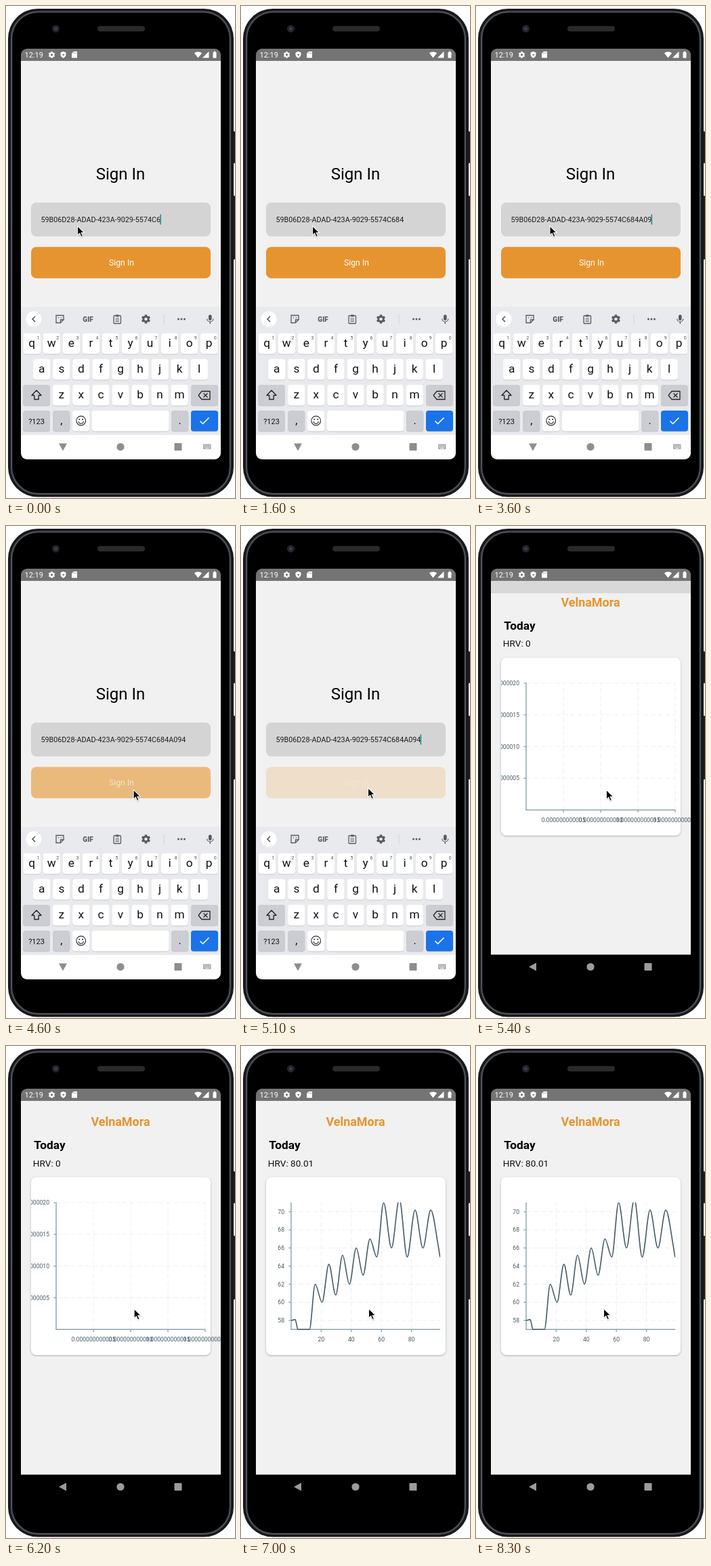
Recreate the animation shown at these times as an HTML page with a canvas. Size 338 px wide and 726 px high, loop 9000 ms.

```html
<!DOCTYPE html>
<html lang="en">
<head>
<meta charset="utf-8">
<title>Sign in and chart</title>
<style>
html, body { margin: 0; width: 100%; height: 100%; overflow: hidden; background: #fff; }
canvas { display: block; width: 338px; height: 726px; }
</style>
</head>
<body>
<canvas id="stage"></canvas>
<script>
const W = 338, H = 726, LOOP = 9000, STEP = 100;
const FONT = 'Roboto, "Liberation Sans", sans-serif';
const ORANGE = '#e69430', BG = '#f1f1f1', INK = '#455a64', AXIS = '#90a4ae', GRID = '#eceff1';
const ICON = '#555a5f', KEY = '#cbcdd2', DARK = '#222', BAR = '#747474';
const PRESS = 4500, SWITCH = 5300, DATA_IN = 6300;
const CODE = '59B06D28-ADAD-423A-9029-5574C684A094';
// [time, characters in the field]
const EDITS = [[0, 30], [100, 31], [1100, 32], [1700, 33], [2600, 35], [2900, 36], [3600, 35], [3900, 36]];
// pointer moves: [start, duration, x, y]
const MOVES = [[2900, 300, 109, 324.5], [3800, 600, 190, 397], [4400, 300, 187.5, 386.5],
  [5200, 100, 192.5, 389.5], [5300, 1200, 188.5, 387.5]];
// alternating peaks and valleys of the heart rate
const TURNS = [62, 60, 64.2, 60.8, 65.2, 62, 66, 63, 67, 65, 71, 66, 71.4, 65, 70.2, 66, 70.2, 66];

const canvas = document.getElementById('stage');
const c = canvas.getContext('2d');
const ratio = window.devicePixelRatio || 1;
canvas.width = W * ratio;
canvas.height = H * ratio;

function rect(x, y, w, h, fill) {
  c.fillStyle = fill;
  c.fillRect(x, y, w, h);
}
function box(x, y, w, h, r, fill) {
  c.beginPath();
  c.roundRect(x, y, w, h, r);
  if (fill) { c.fillStyle = fill; c.fill(); }
}
function disc(x, y, r, fill) {
  c.beginPath();
  c.arc(x, y, r, 0, 7);
  c.fillStyle = fill;
  c.fill();
}
function ink(color, width) {
  c.strokeStyle = color;
  c.lineWidth = width;
  c.stroke();
}
function arc(x, y, r, end, color, width) {
  c.beginPath();
  c.arc(x, y, r, 0, end);
  ink(color, width);
}
function trace(points) {
  c.beginPath();
  points.forEach(([x, y]) => c.lineTo(x, y));
}
function shape(points, fill) {
  trace(points);
  c.closePath();
  c.fillStyle = fill;
  c.fill();
}
function line(points, color, width) {
  trace(points);
  ink(color, width);
}
function text(s, x, y, size, color, align = 'left', weight = 400) {
  c.font = `${weight} ${size}px ${FONT}`;
  c.textAlign = align;
  c.fillStyle = color;
  c.fillText(s, x, y);
}
function group(draw) {
  c.save();
  draw();
  c.restore();
}
function clip(x, y, w, h, r = 0) {
  box(x, y, w, h, r);
  c.clip();
}
function gear(x, y, r, color, hole) {
  for (let i = 0; i < 3; i++) {
    const a = Math.PI * (i / 3 + 1 / 6), dx = Math.cos(a) * r, dy = Math.sin(a) * r;
    line([[x - dx, y - dy], [x + dx, y + dy]], color, r * .55);
  }
  disc(x, y, r * .77, color);
  disc(x, y, r * .36, hole);
}

function phone() {
  rect(0, 0, W, H, '#fff');
  box(333, 185, 5, 47, 1, '#1b1c1e');
  box(333, 280, 5, 94, 1, '#1b1c1e');
  box(3, 4, 333, 720.5, 44, '#17191b');
  box(8, 8.5, 323, 711.5, 39.5);
  ink('#505459', 2);
  box(10, 10.5, 319, 707.5, 37.5, '#000');
  box(135, 29.5, 70, 8, 4, '#2a2a2b');
  disc(73.5, 33.5, 5.5, '#222326');
  disc(73.5, 33.5, 2.5, '#34404e');
}

function statusBar() {
  rect(22, 63, 295, 18, BAR);
  text('12:19', 27.5, 76, 11, '#fff');
  gear(67.5, 72, 4.7, '#fff', BAR);
  shape([[84.5, 67], [88.5, 68.7], [88.5, 72], [87.3, 75], [84.5, 77], [81.7, 75], [80.5, 72], [80.5, 68.7]], '#fff');
  shape([[83, 71], [86.5, 71], [84.7, 74]], BAR);
  shape([[100, 67], [105, 67], [105, 76.5], [97, 76.5], [97, 70]], '#fff');
  for (let x = 99.4; x < 104; x += 1.8) rect(x, 68.5, .7, 1.8, BAR);
  c.beginPath();
  c.moveTo(283.5, 76.5);
  c.arc(283.5, 76.5, 9, -2.25, -.89);
  c.fillStyle = '#fff';
  c.fill();
  shape([[299.5, 67], [299.5, 76.5], [290, 76.5]], '#fff');
  box(305.5, 68, 5, 8.7, 1, '#fff');
  rect(306.8, 66.8, 2.4, 2, '#fff');
}

function signIn(t) {
  rect(22, 81, 295, 552, BG);
  text('Sign In', 169, 256, 24, '#000', 'center');
  box(37, 290, 265, 50, 7.5, '#d4d4d4');

  const [since, count] = EDITS.filter(e => e[0] <= t).pop();
  const typed = CODE.slice(0, count);
  text(typed, 51.4, 319, 10.77, '#1c1c1c');
  if ((t - since) % 1000 < 500) rect(50.7 + c.measureText(typed).width, 307.5, 1.5, 15, '#128a83');

  group(() => {
    c.globalAlpha = 1 - .8 * Math.min(1, Math.max(0, (t - PRESS) / 200));
    box(37, 355.5, 265, 46.3, 7.5, ORANGE);
    text('Sign In', 170.5, 383, 12.2, '#fff', 'center');
  });
}

// smooth line that is level at every peak and valley
function curve(points) {
  const slope = i => (points[i + 1][1] - points[i][1]) / (points[i + 1][0] - points[i][0]);
  const tangent = i => {
    if (i === 0 || i === points.length - 1) return 0;
    const a = slope(i - 1), b = slope(i);
    return a * b <= 0 ? 0 : 2 * a * b / (a + b);
  };
  c.beginPath();
  c.moveTo(...points[0]);
  for (let i = 0; i < points.length - 1; i++) {
    const [x0, y0] = points[i], [x1, y1] = points[i + 1], d = (x1 - x0) / 3;
    c.bezierCurveTo(x0 + d, y0 + d * tangent(i), x1 - d, y1 - d * tangent(i + 1), x1, y1);
  }
}

function chart(full) {
  const left = 74, right = 294, top = 231, base = 418.3;
  const valueY = v => base - (v - 57) * 13.36;
  const range = (n, make) => Array.from({ length: n }, (_, i) => make(i + 1));
  const tiny = i => '0.0000000000' + String(i * 5).padStart(2, '0');
  const xs = full ? range(4, i => [left + i * 44.4, i * 20]) : range(4, i => [left + i * 55, tiny(i)]);
  const ys = full ? range(7, i => [valueY(56 + 2 * i), 56 + 2 * i]) : range(4, i => [base - i * 46.8, tiny(i)]);

  group(() => {
    c.setLineDash([7.2, 3.6]);
    xs.forEach(([x]) => line([[x, base], [x, top]], GRID, 1));
    ys.forEach(([y]) => line([[left, y], [right, y]], GRID, 1));
  });
  line([[left, top], [left, base + .7]], AXIS, 1.45);
  line([[left - .7, base], [right, base]], AXIS, 1.45);
  group(() => {
    clip(37, 190, 280, 268);
    xs.forEach(([x, label]) => {
      line([[x, base], [x, base + 3.6]], AXIS, 1.4);
      text(label, x, 436, 8.6, INK, 'center');
    });
    ys.forEach(([y, label]) => {
      line([[left - 3.6, y], [left, y]], AXIS, 1.4);
      text(label, 64, y + 3.1, 8.6, INK, 'right');
    });
  });
  if (full) group(() => {
    clip(left - .5, top - .3, 220.5, base - top + 1);
    const turns = TURNS.map((v, i) => [109.5 + 10.1 * i + 1.5 * Math.max(0, i - 10), v]);
    const points = [[left, 58], [80, 58.1], [84, 57], [101, 57], ...turns, [right, 65]];
    curve(points.map(([x, v]) => [x, valueY(v)]));
    ink(INK, 1.6);
  });
}

function home(t) {
  const full = t >= DATA_IN;
  rect(22, 81, 295, 552, BG);
  text('VelnaMora', 169, 118, 17.9, ORANGE, 'center', 700);
  text('Today', 41.3, 152, 17.3, '#000', 'left', 700);
  text('HRV: ' + (full ? '80.01' : '0'), 39.8, 177.5, 13.6, '#111');
  group(() => {
    c.shadowColor = 'rgba(0,0,0,.28)';
    c.shadowBlur = 3 * ratio;
    c.shadowOffsetY = ratio;
    box(37, 193.5, 265, 262.5, 7.5, '#fff');
  });
  chart(full);
}

function key(x, y, w, fill, label = '', size = 17.3) {
  box(x, y + 1, w, 30.5, 4, '#c4c7cc');
  box(x, y, w, 30.5, 4, fill);
  text(label, x + w / 2, y + 20.3, size, '#111', 'center');
}

function toolbar(open) {
  disc(41, 462, 11.5, '#fff');
  const d = open ? 2 : -2;
  line([[41 + d, 458], [41 - d, 462], [41 + d, 466]], '#444', 1.4);
  box(299, 455.5, 4.6, 8.5, 2.3, ICON);
  arc(301.3, 461.5, 4.5, Math.PI, ICON, 1.2);
  rect(300.7, 466, 1.3, 3, ICON);
  if (!open) return;

  line([[85, 463], [85, 456.5], [74, 456.5], [74, 467.5], [80.5, 467.5], [85, 463], [80.5, 463], [80.5, 467.5]], ICON, 1.3);
  disc(77.5, 460, .8, ICON);
  disc(81.5, 460, .8, ICON);
  text('GIF', 121, 465.5, 10, ICON, 'center', 900);
  box(159, 457, 10.5, 11.5, 1);
  ink(ICON, 1.3);
  box(162, 455.5, 4.5, 3, 1, ICON);
  for (let y = 460.5; y < 466; y += 2.3) rect(161.5, y, 5.5, .9, ICON);
  gear(206.5, 462, 6.5, ICON, '#e9eaee');
  rect(232.5, 454.5, 1, 15.5, '#cfd1d5');
  for (let x = 254.5; x < 264; x += 4.5) disc(x, 462, 1.5, ICON);
}

function keyboard(open) {
  rect(22, 444, 295, 189, '#e9eaee');
  rect(22, 633, 295, 40, '#fff');
  toolbar(open);
  ['qwertyuiop', 'asdfghjkl', 'zxcvbnm'].forEach((keys, row) => {
    const y = 483 + row * 38;
    [...keys].forEach((k, i) => {
      const x = 169 + (i - (keys.length - 1) / 2) * 29.05;
      key(x - 12.7, y, 25.4, '#fff', k);
      if (!row) text((i + 1) % 10, x + 9, y + 8.5, 7, '#555', 'center');
    });
  });
  c.lineJoin = 'round';
  key(25, 559, 40, KEY);
  line([[45, 567], [52, 574.5], [48.2, 574.5], [48.2, 580.5], [41.8, 580.5], [41.8, 574.5], [38, 574.5], [45, 567]], DARK, 1.3);
  key(273, 559, 40, KEY);
  line([[284, 574.5], [289, 568.5], [301, 568.5], [301, 580.5], [289, 580.5], [284, 574.5]], DARK, 1.3);
  line([[291.5, 571.5], [297.5, 577.5]], DARK, 1.3);
  line([[297.5, 571.5], [291.5, 577.5]], DARK, 1.3);

  key(25, 597, 40, KEY, '?123', 11);
  key(69, 597, 25.4, KEY, ',', 16);
  key(98, 597, 25.4, '#fff');
  arc(110.7, 612, 6.8, 7, '#333', 1.2);
  arc(110.7, 612.8, 3.5, Math.PI, '#333', 1.2);
  disc(108.3, 610, 1.1, '#333');
  disc(113.1, 610, 1.1, '#333');
  key(127, 597, 113.5, '#fff');
  key(244, 597, 25.4, KEY, '.', 16);
  key(273, 597, 40, '#1a73e8');
  line([[286.5, 612.5], [290.5, 616.5], [299.5, 607.5]], '#fff', 1.6);

  if (!open) return;
  box(291, 646.5, 11.5, 7.5, 1, '#a9a9a9');
  for (let i = 0; i < 8; i++) rect(292.3 + i % 4 * 2.4, i < 4 ? 648.3 : 650.3, 1.2, 1, '#fff');
  rect(294, 652.2, 5.5, 1, '#fff');
}

function navIcons(t) {
  // 1 with the keyboard open, 0 once it has gone
  const down = t < SWITCH ? 1 : t === SWITCH ? .5 : 0;
  const color = ['#9c9c9c', '#858585', '#8e8e8e'][down * 2];
  group(() => {
    c.translate(84, 650.5);
    c.rotate(-down * Math.PI / 2);
    shape([[-6, 0], [5, -6], [5, 6]], color);
  });
  disc(169, 650.5, 5.6, color);
  box(248.5, 645, 11, 11, 1, color);
}

function pointer(t) {
  let x = 105.5, y = 324.5;
  for (const [start, time, toX, toY] of MOVES) {
    const k = Math.min(1, Math.max(0, (t - start) / time)), e = k * k * (3 - 2 * k);
    x += (toX - x) * e;
    y += (toY - y) * e;
  }
  group(() => {
    c.translate(x, y);
    c.shadowColor = 'rgba(0,0,0,.35)';
    c.shadowBlur = 2 * ratio;
    c.shadowOffsetY = ratio;
    shape([[0, 0], [0, 14], [3.2, 11], [5.5, 16.3], [8, 15.2], [5.7, 10], [10.2, 10]], '#000');
    c.shadowColor = 'transparent';
    ink('#fff', 1.1);
  });
}

// the new screen is revealed upwards over the dimmed old one
function reveal(t) {
  const gap = t < SWITCH + 400 ? 79 * Math.exp((SWITCH - t) / 68) : 0;
  rect(22, 81, 295, 552, '#d8d8d8');
  group(() => {
    clip(22, 81 + gap, 295, 552 - gap);
    c.translate(0, gap * .042);
    home(t);
  });
  rect(22, 632.5, 295, 37, '#000');
  if (t === SWITCH) group(() => {
    c.globalAlpha = .93;
    c.translate(0, 4);
    keyboard(false);
    rect(22, 629, 295, 40, 'rgba(0,0,0,.1)');
  });
}

function draw(t) {
  c.setTransform(ratio, 0, 0, ratio, 0, 0);
  phone();
  group(() => {
    clip(22, 63, 295, 606, 9);
    if (t < SWITCH) {
      signIn(t);
      keyboard(true);
    } else {
      reveal(t);
    }
    navIcons(t);
    statusBar();
  });
  pointer(t);
}

function tick() {
  draw(Math.floor(performance.now() % LOOP / STEP) * STEP);
  requestAnimationFrame(tick);
}
tick();
</script>
</body>
</html>
```
